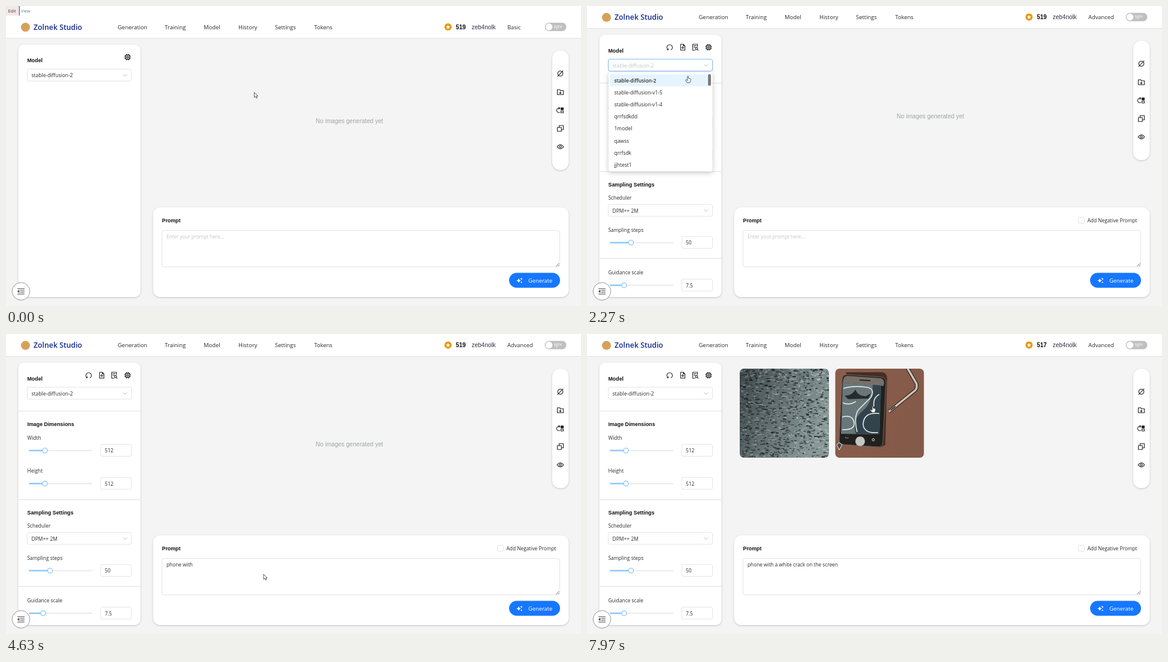
These frames come from a looping animation (960 px wide and 502 px high, 8000 ms). An HTML page:

```html
<!DOCTYPE html>
<html lang="en">
<head>
<meta charset="utf-8">
<title>Image generation</title>
<style>
html, body { margin: 0; width: 100%; height: 100%; overflow: hidden; background: #fff; }
svg { display: block; width: 100%; height: 100%; }
text { font-family: "Open Sans", "Noto Sans", sans-serif; white-space: pre; }
.alt { font-family: "Liberation Sans", Arial, sans-serif; }
.b { font-weight: 700; }
.card { fill: #fff; filter: drop-shadow(0 1px 1.5px rgba(0,0,0,.2)); }
.box { fill: #fff; stroke: #d9d9d9; stroke-width: .7; }
.ico { fill: none; stroke: #222; stroke-width: 1.1; stroke-linejoin: round; stroke-linecap: round; }
</style>
</head>
<body>
<svg id="stage" viewBox="0 0 960 502" preserveAspectRatio="none"></svg>
<script>
const LOOP = 8000, MENU_END = 870, GROW = 1050, ADVANCED = 1400;
const OPEN = 2020, CLOSE = 2500, SUBMIT = 5430, DONE = 7600;
const INK = '#2b2b2b', PROMPT = 'phone with a white crack on the screen';

// Text placed by the vertical middle of its capitals.
const text = (x, y, s, size = 8.35, fill = INK, extra = '') =>
  `<text x="${x}" y="${y + size * .36}" font-size="${size}" fill="${fill}" ${extra}>${s}</text>`;
const head = (x, y, s) => text(x, y, s, 8.85, '#111', 'class="alt b"');
const rect = (x, y, w, h, r, attrs) =>
  `<rect x="${x}" y="${y}" width="${w}" height="${h}" rx="${r}" ${attrs}/>`;
const path = (d, attrs) => `<path d="${d}" ${attrs}/>`;
const icon = (x, y, body) => `<g class="ico" transform="translate(${x} ${y})">${body}</g>`;
const circle = (x, y, r, attrs = '') => `<circle cx="${x}" cy="${y}" r="${r}" ${attrs}/>`;
const line = y => path(`M21 ${y}H224`, 'stroke="#dedede"');
const field = (x, y, w, s) => rect(x, y - 10, w, 20, 3, 'class="box"') + text(x + 7, y + .5, s);
const select = (y, s, id) => rect(35.5, y - 10, 174, 20, 3, `class="box" id="${id}Box"`) +
  text(42.5, y + .5, s, 8.5, INK, `id="${id}Text"`) +
  path(`M195.500 ${y - 1.500}l3.200 3.500 3.200-3.500`, 'fill="none" stroke="#b8b8b8" stroke-width=".9"');
const check = (x, y, s) => rect(x, y - 5, 10, 10, 2, 'class="box"') + text(x + 15, y + .5, s);
const slider = (y, label, knob, value, id = '') => text(35.5, y - 21.5, label) +
  path(`M38 ${y}H144`, 'stroke="#eee" stroke-width="2.500"') +
  `<g stroke="#91caff" id="${id}">` + path(`M38.500 ${y}H${knob}`, 'stroke-width="2.500"') +
  circle(knob, y, 4.1, 'fill="#fff" stroke-width="1.400"') + '</g>' + field(158, y - .3, 51.5, value);

// Seeded random numbers.
function random(seed) {
  return () => (seed = (seed * 16807) % 2147483647) / 2147483647;
}

function texture() {
  const rnd = random(71);
  let s = rect(255, 58, 149, 149, 0, 'fill="url(#slate)"');
  for (let i = 0; i < 1500; i++) {
    const u = rnd(), v = rnd(), dark = rnd() < .62 - u * .2;
    const tone = dark ? 18 + rnd() * 45 : 105 + u * 55 + rnd() * 60;
    const rgb = [tone * .92, tone, tone * 1.01].map(Math.round);
    s += rect((254 + u * 148).toFixed(1), (57 + v * 149).toFixed(1),
      (1.5 + rnd() * 4.5).toFixed(1), (.7 + rnd() * 1.7).toFixed(1), .4,
      `fill="rgb(${rgb})" opacity="${dark ? .75 : .65}"`);
  }
  return s;
}

function phone() {
  const white = 'fill="none" stroke="#dfe5df" stroke-width="1.700"';
  return rect(414, 58, 149, 149, 0, 'fill="url(#clay)"') +
    path('M432 64H493Q501 65 501 75L498 186 488 190Z', 'fill="#472d22"') +
    path('M434 68L491 72Q499 73 499 81L494 182Q493 189 486 189L428 185Q421 184 421 177L426 75Q427 68 434 68Z', 'fill="#20201f" stroke="#6f6761"') +
    path('M428 76Q429 70 435 70L490 74Q496 75 496 82L495 87 427 82Z', 'fill="#777069"') +
    path('M455 77L473 78', 'stroke="#222" stroke-width="2"') +
    path('M427 82L491 86 488 168 424 167Z', 'fill="#69777a"') +
    path('M477 85L491 86 488 168 449 167Q441 144 462 127 477 114 477 85Z', 'fill="#33434d"') +
    path('M430 103Q443 103 448 93 453 105 466 104L474 99 470 108 436 109Z', 'fill="#252c2e"') +
    path('M428 91Q445 86 466 89 482 91 474 106 463 117 453 127 445 139 451 164', white) +
    path('M426 139Q443 134 446 148 448 161 426 160M488 101Q477 107 479 121M488 133Q462 130 461 151 462 167 486 165M427 115Q437 120 449 113', white) +
    circle(456, 179.500, 8, 'fill="#c5c6c3"') + circle(478, 177, 2, 'fill="none" stroke="#ddd"') +
    text(431, 174, 'For', 4, '#ddd') +
    path('M417 185L421 182 426 185 421 194Z', 'fill="#41484b" stroke="#eee"') +
    path('M535 57L550 83Q552 91 547 95L504 130', 'fill="none" stroke="#38251f" stroke-width="6"') +
    path('M535 57L550 83Q552 91 547 95L504 130', 'fill="none" stroke="#c9c6bd" stroke-width="3.500"') +
    path('M507 127.500L515 121', 'stroke="#303638" stroke-width="2"');
}

const nav = [[186.5, 'Generation'], [265, 'Training'], [330, 'Model'], [388, 'History'], [449, 'Settings'], [514.5, 'Tokens']];
const models = ['stable-diffusion-2', 'stable-diffusion-v1-5', 'stable-diffusion-v1-4', 'qrrfsdkdd', '1model', 'qawss', 'qrrfsdk', 'jjhtest1'];
const page5 = 'M-3.200-5H1.200L4-2.200V5H-3.200ZM1.200-5V-2.200H4';

const header = rect(0, 0, 960, 37, 0, 'fill="#fff"') + path('M0 37.500H960', 'stroke="#e2e2e2"') +
  circle(32.5, 19, 7.5, 'fill="#d5a15a"') +
  text(46, 19, 'Zolnek Studio', 12.3, '#10298e', 'font-weight="600"') +
  nav.map(([x, s]) => text(x, 19, s, 9.45)).join('') +
  circle(738, 18.5, 6, 'fill="#e59a12"') +
  path('M738 15l1 2.300 2.500.2-1.900 1.700.6 2.500-2.200-1.300-2.200 1.300.6-2.500-1.900-1.700 2.500-.2Z', 'fill="#fff"') +
  text(751, 18.5, '519', 10, '#111', 'class="alt b" id="count"') +
  text(777.5, 18.5, 'zeb4nolk', 10, '#2c3446', 'class="alt"') +
  text(837, 19, 'Basic', 9.35, INK, 'id="mode"') +
  rect(899.5, 11.5, 36, 14, 7, 'fill="#bfbfbf"') + circle(906.5, 18.5, 5.8, 'fill="#fff"') +
  text(914.5, 18, 'light', 6.9, '#fff');

const tools = rect(912, 58, 27.5, 200, 13, 'class="card"') +
  icon(925.5, 96.5, circle(0, 0, 4.3) + path('M-4.500 4.700L4.500-4.700', '')) +
  icon(925.5, 127.5, path('M-5-4H-1L.5-2.500H5V4.300H-5ZM0-.8V2.700M-1.500 1.300L0 2.700 1.500 1.300', '')) +
  icon(925.5, 158, path('M-1-3.500H-2.500A3.500 3.500 0 0 0-2.500 3.800H-1M-2.500-5L-.8-3.500-2.500-2', '') +
    rect(1, -4.2, 4, 3.5, 0, 'fill="#222"') + rect(1, 1.2, 4, 3, 0, '')) +
  icon(925.5, 188.5, path('M-2-1.800V-5H5V2H1.800', '') + rect(-5, -1.8, 6.8, 6.6, 0, '')) +
  icon(925.5, 219, path('M-5.300 0Q0-7 5.300 0 0 7-5.300 0Z', '') + circle(0, 0, 1.7));

const settings = line(129) + head(35.5, 151, 'Image Dimensions') +
  icon(138, 69, path('M-2.500 4.200A4.600 4.600 0 1 1 2.500 4.200M-4.200 4.300H-2.300V2.500', '')) +
  icon(159.5, 69, path(page5 + 'M.4-1.300V2.900M-1.700.8H2.500', '')) +
  icon(180.5, 69, path('M4-1V-5H-4V5H0M-2-2.500H2M-2 0H0', '') + circle(2.2, 2.2, 1.8) + path('M3.600 3.600L5 5', '')) +
  slider(195, 'Width', 65, '512') + slider(250.3, 'Height', 65, '512', 'heightBar') + line(277) +
  head(35.5, 298.5, 'Sampling Settings') + text(35.5, 320.5, 'Scheduler') + select(342, 'DPM++ 2M', 'sched') +
  slider(396, 'Sampling steps', 73.5, '50') + line(422.3) +
  slider(467.3, 'Guidance scale', 62, '7.5') +
  text(35.5, 500.5, 'Seed') + field(35.5, 522, 174, '-1') + check(35.5, 544, 'Random') + line(566.5) +
  head(35.5, 588, 'Batch Settings') + text(35.5, 609.5, 'Batch count') + text(127.5, 609.5, 'Batch size') +
  field(35.5, 631, 82, '1') + field(127.5, 631, 82, '2');

const sidebar = rect(20.5, 48, 204, 422, 9, 'class="card" id="side"') +
  '<g clip-path="url(#sideClip)"><g id="scroll">' + head(35.5, 74.5, 'Model') +
  icon(203, 69, rect(-3.5, -3.5, 7, 7, 1.5, 'stroke-width="1.400"') + rect(-1.3, -1.3, 2.6, 2.6, 0, '') +
    path('M-1.500-5V-4M1.500-5V-4M-1.500 4V5M1.500 4V5M-5-1.500H-4M-5 1.500H-4M4-1.500H5M4 1.500H5', '')) +
  select(99, 'stable-diffusion-2', 'model') + `<g id="settings">${settings}</g></g></g>`;

const list = '<g id="list">' +
  rect(36, 111, 173.5, 166, 4, 'fill="#fff" style="filter:drop-shadow(0 2px 4px rgba(0,0,0,.22))"') +
  rect(38.5, 114.5, 163, 20, 2, 'fill="#e6f4ff"') + rect(202, 114, 5, 19.5, 2.5, 'fill="#7c7c7c"') +
  models.map((s, i) => text(45.5, 125 + i * 20.1, s, i ? 8.45 : 8.3, INK, i ? '' : 'font-weight="600"')).join('') + '</g>';

// Laid out for the full height, then moved with the bottom edge.
const bottom = '<g id="bottom">' + rect(245.5, 337, 694, 150, 12, 'class="card"') +
  head(260.5, 358.5, 'Prompt') + `<g id="negative">${check(820.5, 358.5, 'Add Negative Prompt')}</g>` +
  rect(260.5, 375.5, 664, 61, 4, 'class="box"') +
  path('M918.500 435.500L923.500 430.500M921.500 435.500L923.500 433.500', 'stroke="#555" stroke-width=".9"') +
  text(268, 386, '', 8.3, INK, 'id="prompt"') +
  rect(840, 446.5, 85, 25, 12.5, 'id="button"') + text(872, 459.5, 'Generate', 9.33, '#fff') +
  path('M856 455.500Q856.600 459 860 459.500 856.600 460 856 463.500 855.400 460 852 459.500 855.400 459 856 455.500ZM860.500 454.500l.6 1.500 1.500.6-1.500.6-.6 1.500-.6-1.500-1.500-.6 1.500-.6ZM860.500 460.500l.5 1.200 1.200.5-1.200.5-.5 1.200-.5-1.200-1.200-.5 1.200-.5Z', 'fill="#fff"') + '</g>';
const fold = '<g id="fold">' + circle(25, 477.5, 14.8, 'fill="#fff" stroke="#8c8c8c" stroke-width=".9"') +
  icon(25, 477.5, path('M-5.500-4.500H5.500M-1-1.500H5.500M-1 1.500H5.500M-5.500 4.500H5.500M-3.200-1.700L-5.300 0-3.200 1.700Z', 'stroke="#444"')) + '</g>';

const spinner = x => `<g class="spin" data-x="${x}">` +
  [[-1, -1], [1, -1], [1, 1], [-1, 1]].map(([a, b]) => circle(a * 5.5, b * 5.5, 3.5, 'fill="#1677ff"')).join('') + '</g>';
const clip = (id, x, y, w, h, r) => `<clipPath id="${id}">${rect(x, y, w, h, r, `id="${id}Rect"`)}</clipPath>`;
const ramp = (id, a, b) => `<linearGradient id="${id}" x2="1" y2=".4"><stop stop-color="${a}"/><stop offset="1" stop-color="${b}"/></linearGradient>`;

const stage = document.getElementById('stage');
stage.innerHTML = '<defs>' + clip('sideClip', 20.5, 48, 204, 422, 9) + clip('leftPic', 255, 58, 149, 149, 7) +
  clip('rightPic', 414.5, 58, 148, 149, 7) + ramp('slate', '#3d474b', '#879796') + ramp('clay', '#8b5d4b', '#845a49') + '</defs>' +
  rect(0, 0, 960, 502, 0, 'fill="#fff"') + '<g id="page">' +
  rect(0, 37, 960, 465, 0, 'fill="#f4f4f4" id="back"') + header +
  text(573.3, 184.5, 'No images generated yet', 10.08, '#a0a4ab', 'class="alt" text-anchor="middle" id="empty"') +
  `<g id="wait">${spinner(329.5)}${spinner(488)}</g>` +
  `<g id="pics"><g clip-path="url(#leftPic)">${texture()}</g><g clip-path="url(#rightPic)">${phone()}</g></g>` +
  tools + sidebar + list + bottom + fold + '</g>' +
  '<g id="menu">' + rect(0, 0, 960, 16.5, 0, 'fill="#fff"') + rect(0, 0, 21, 16, 0, 'fill="#f5e6e6"') +
  text(3.5, 8, 'Edit', 7.3, '#444') + path('M22.300 0V16', 'stroke="#2d6da8" stroke-width="1.300"') + text(25, 8, 'View', 7.2, '#6a7f8e') + '</g>' +
  '<g id="cursor" stroke="#333" stroke-width=".8" stroke-linejoin="round" fill="#fff">' +
  path('M0 0V8.500L2 6.700 3.500 9.700 5 9 3.500 6.200H6Z', 'id="arrow"') +
  path('M-.9.8Q0-.7.9.8V4L4.300 5Q5 5.300 4.900 6.200L4.200 9.200 3.200 11.300H-1L-4 7.500Q-4.200 6-2.800 6.400L-.9 7.700Z', 'id="hand"') + '</g>';

const el = {};
stage.querySelectorAll('[id]').forEach(n => { el[n.id] = n; });
const show = (n, on) => n.setAttribute('display', on ? 'inline' : 'none');
const move = (n, x, y) => n.setAttribute('transform', `translate(${x} ${y})`);
const within = (t, a, b) => t >= a && t < b;

const route = [[0, 414.5, 144.5], [60, 414.5, 144.5], [650, 845, 36], [1150, 845, 36], [1330, 850, 60], [1450, 850, 60],
  [1930, 150, 95], [2050, 150, 95], [2220, 168.5, 117], [2520, 168.5, 117], [2800, 89.5, 188.5], [3500, 89.5, 188.5],
  [3750, 123, 196], [4130, 123, 196], [4450, 430, 402], [4980, 430, 402], [5260, 909, 460.5], [5440, 909, 460.5], [5850, 477, 120]];
const wheel = [[2850, 0], [3200, 125.5], [3400, 180], [3650, 180], [4100, 1.5], [4150, 0]];
const hands = [[610, 1450], [1920, 2560], [2780, 3500], [5220, 5480], [DONE, LOOP]];

function at(keys, t, ease) {
  const i = keys.findIndex(k => k[0] > t);
  if (i < 0) return keys[keys.length - 1].slice(1);
  if (!i) return keys[0].slice(1);
  const a = keys[i - 1], b = keys[i], p = (t - a[0]) / (b[0] - a[0]);
  const q = ease ? p * p * (3 - 2 * p) : p;
  return a.slice(1).map((v, j) => v + (b[j + 1] - v) * q);
}

function draw(t) {
  const menu = t < MENU_END, height = t < GROW ? 485.5 : 502;
  const advanced = t >= ADVANCED, open = within(t, OPEN, CLOSE), drop = height - 502;
  show(el.menu, menu);
  move(el.page, 0, menu ? 16.5 : 0);
  el.back.setAttribute('height', height - 37);
  el.side.setAttribute('height', height - 63);
  el.sideClipRect.setAttribute('height', height - 63);
  move(el.bottom, 0, drop);
  move(el.fold, 0, drop);
  move(el.empty, 0, drop / 2);

  el.mode.textContent = advanced ? 'Advanced' : 'Basic';
  el.mode.setAttribute('fill', within(t, 610, ADVANCED) ? '#62aee0' : INK);
  show(el.settings, advanced);
  show(el.negative, advanced);
  show(el.list, open);
  el.modelBox.style.stroke = open ? '#4096ff' : '';
  el.modelText.setAttribute('fill', open ? '#c2c2c2' : INK);
  move(el.scroll, 0, -at(wheel, t)[0]);
  el.heightBar.setAttribute('stroke', within(t, 2990, 3260) ? '#69b1ff' : '#91caff');

  const typed = Math.round(PROMPT.length * Math.min(1, Math.max(0, (t - 4500) / 480)));
  el.prompt.textContent = typed ? PROMPT.slice(0, typed) : 'Enter your prompt here...';
  el.prompt.setAttribute('fill', typed ? INK : '#c4c4c4');
  el.prompt.setAttribute('font-size', typed ? 8.3 : 8.1);
  el.button.setAttribute('fill', within(t, 5220, 5470) ? '#4096ff' : '#1677ff');

  show(el.empty, t < SUBMIT);
  show(el.wait, within(t, SUBMIT, DONE));
  show(el.pics, t >= DONE);
  el.count.textContent = t < DONE ? '519' : '517';
  stage.querySelectorAll('.spin').forEach(s => {
    const age = t - SUBMIT;
    s.setAttribute('transform', `translate(${s.dataset.x} 132) rotate(${45 + age * .3})`);
    [...s.children].forEach((dot, i) => {
      const wave = Math.abs(((age - i * 400 + 4000) / 1000) % 2 - 1);
      dot.setAttribute('opacity', 1 - .7 * wave);
    });
  });

  const hand = hands.some(([a, b]) => within(t, a, b));
  show(el.hand, hand);
  show(el.arrow, !hand);
  move(el.cursor, ...at(route, t, true));
}

const start = performance.now();
function tick() {
  draw((performance.now() - start) % LOOP);
  requestAnimationFrame(tick);
}
tick();
</script>
</body>
</html>
```
